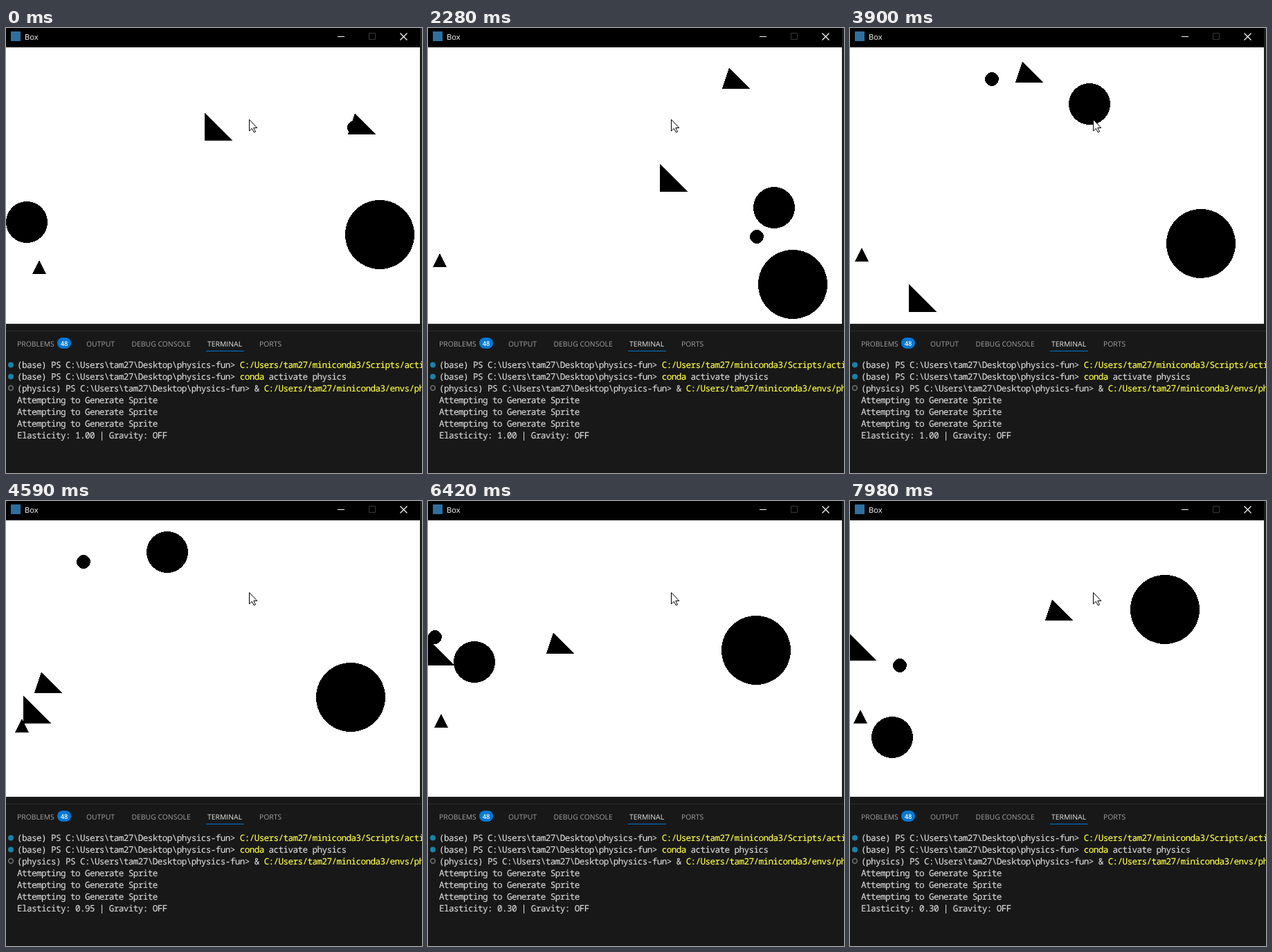
Write an HTML page that moves like this. It is 601 px wide and 644 px high and loops after 8 s.

```html
<!DOCTYPE html>
<html lang="en">
<head>
<meta charset="utf-8">
<title>Box</title>
<style>
  html, body { margin: 0; width: 100%; height: 100%; overflow: hidden; background: #181818; }
  svg { display: block; width: 601px; height: 644px; }
  text { white-space: pre; text-rendering: geometricPrecision; }
  .ui { font-family: "Open Sans", "Noto Sans", sans-serif; font-size: 10.4px; fill: #a2a2a2; }
  .term { font-family: "Noto Sans Mono", "DejaVu Sans Mono", monospace; font-size: 12.7px;
    letter-spacing: -.62px; fill: #d8d8d8; stroke: #d8d8d8; stroke-width: .15px; }
  .cmd { fill: #ffff45; stroke: #ffff45; }
</style>
</head>
<body>
<svg viewBox="0 0 601 644">
  <defs><clipPath id="view"><rect y="28" width="598" height="400"/></clipPath></defs>
  <rect width="601" height="644" fill="#181818"/>
  <rect x="598" width="3" height="428" fill="#1f1f1f"/>

  <rect width="598" height="28"/>
  <rect x="7" y="5" width="14" height="14" fill="#2f6f9f"/>
  <text class="ui" x="27" y="17" style="font-size:11.2px;fill:#fff">Box</text>
  <g fill="none" stroke="#fff">
    <path d="M479 12.5h10"/>
    <path d="M524.5 7.5h9v9h-9z" stroke="#383838"/>
    <path d="M569.5 7.5l10 10M579.5 7.5l-10 10" stroke-width="1.2"/>
  </g>

  <rect y="28" width="598" height="400" fill="#fff"/>
  <path d="M0 428.5h598" stroke="#2b2b2b"/>
  <g id="scene" clip-path="url(#view)" shape-rendering="crispEdges"></g>
  <path d="M351.5 132.5v16.5l3.8-3.6 3 5.6 2.2-1-2.7-5.5h5z" fill="#fff" stroke="#000"/>

  <path d="M0 438.5h601" stroke="#2b2b2b"/>
  <g class="ui">
    <text x="16" y="461">PROBLEMS</text>
    <rect x="74" y="448" width="20" height="16" rx="8" fill="#0078d4"/>
    <text x="84" y="460" text-anchor="middle" style="font-size:9.3px;font-weight:600;fill:#fff">48</text>
    <text x="116" y="461">OUTPUT</text>
    <text x="181.5" y="461">DEBUG CONSOLE</text>
    <text x="291" y="461" style="fill:#e7e7e7">TERMINAL</text>
    <path d="M289 467.5h55" stroke="#0078d4"/>
    <text x="366" y="461">PORTS</text>
  </g>

  <g fill="#1b81a8">
    <circle cx="7" cy="487.5" r="4"/>
    <circle cx="7" cy="504.5" r="4"/>
    <circle cx="7" cy="521" r="3.3" fill="none" stroke="#666" stroke-width="1.8"/>
  </g>
  <g class="term">
    <text x="16" y="492">(base) PS C:\Users\tam27\Desktop\physics-fun&gt; <tspan class="cmd">C:/Users/tam27/miniconda3/Scripts/activate</tspan></text>
    <text x="16" y="509">(base) PS C:\Users\tam27\Desktop\physics-fun&gt; <tspan class="cmd">conda</tspan> activate physics</text>
    <text x="16" y="526">(physics) PS C:\Users\tam27\Desktop\physics-fun&gt; &amp; <tspan class="cmd">C:/Users/tam27/miniconda3/envs/physics/python.exe</tspan></text>
    <text x="16" y="543">Attempting to Generate Sprite</text>
    <text x="16" y="560">Attempting to Generate Sprite</text>
    <text x="16" y="577">Attempting to Generate Sprite</text>
    <text id="status" x="16" y="594"></text>
  </g>
</svg>
<script>
const LOOP = 8000, STEP = 71.4;
const BOX = { left: 0, top: 28, right: 598, bottom: 428 };
const scene = document.getElementById('scene');
const status = document.getElementById('status');

// Moments when bodies collide
const [A, B, C, D, E, F, G] = [0, 1230, 2280, 3270, 4590, 6420, 7980];

// Velocity in px/s from time t until the next collision
const go = (t, vx, vy) => ({ t, vx, vy });

function addBody(d, x, y, room, ...legs) {
  const node = document.createElementNS('http://www.w3.org/2000/svg', 'path');
  node.setAttribute('d', d);
  scene.append(node);
  return { node, x, y, room, legs };
}

function addBall(r, x, y, ...legs) {
  const d = `M${-r} 0a${r} ${r} 0 1 0 ${2 * r} 0a${r} ${r} 0 1 0 ${-2 * r} 0z`;
  const room = [BOX.left + r, BOX.right - r, BOX.top + r, BOX.bottom - r];
  return addBody(d, x, y, room, ...legs);
}

// inset is how far the shape may sink into the left wall
function addTriangle(w, h, tip, inset, x, y, ...legs) {
  const room = [BOX.left - inset, BOX.right - w, BOX.top, BOX.bottom - h];
  return addBody(`M${tip} 0L0 ${h}H${w}z`, x, y, room, ...legs);
}

const bodies = [
  addBall(50, 540, 299, go(A, -1.6, 39), go(B, -10.5, 36.2), go(C, -12.7, -37.5)),
  addBall(30, 30, 281, go(A, 217, 14.6), go(B, 193.3, -37.1), go(C, 202, -96),
    go(D, -153.8, -93.2), go(E, -90.7, 86.9), go(F, -3.8, 69.9)),
  addBall(10, 503, 144, go(A, 199.2, 157.7), go(B, 44.8, 186.7), go(C, -198, -291),
    go(D, -126.5, 19.7), go(E, -55.7, 59.6), go(F, 39.7, 26.3)),
  addTriangle(40, 40, 0, 2, 287, 123, go(A, 176.4, -97.6), go(B, -160.5, 137),
    go(D, -155.5, 122.7), go(E, -14.8, -45.4), go(F, 0, -4.5)),
  addTriangle(40, 30, 10, 0, 494, 124, go(A, 42.3, -43.1), go(B, 138, -12.4),
    go(C, -105, -11.1), go(3730, -269, -272), go(E, 71, -31)),
  addTriangle(20, 20, 10, 0, 38, 336, go(A, -13.6, -4.6), go(2800, 7, -4.4), go(E, -2.1, -4))
];

// Mirror a straight flight back and forth between two walls
function bounce(v, lo, hi) {
  const span = hi - lo;
  const u = (((v - lo) % (2 * span)) + 2 * span) % (2 * span);
  return lo + span - Math.abs(span - u);
}

function place({ x, y, room, legs }, t) {
  legs.forEach((leg, i) => {
    const end = Math.min(t, legs[i + 1]?.t ?? LOOP);
    const dt = Math.max(0, end - leg.t) / 1000;
    x = bounce(x + leg.vx * dt, room[0], room[1]);
    y = bounce(y + leg.vy * dt, room[2], room[3]);
  });
  return [Math.round(x), Math.round(y)];
}

// Each picture stays for about one STEP, counted afresh from every collision
function hold(t) {
  const marks = [A, B, C, D, E, F, G, LOOP];
  const i = marks.findIndex(m => m > t) - 1;
  const span = marks[i + 1] - marks[i];
  const step = span / Math.max(1, Math.round(span / STEP));
  return marks[i] + Math.floor((t - marks[i]) / step) * step;
}

// One key press, then key repeat after half a second
function elasticity(t) {
  const presses = t < 4140 ? 0 : t < 4640 ? 1 : Math.min(14, 2 + Math.floor((t - 4640) / 33));
  return (1 - presses * 0.05).toFixed(2);
}

function draw(time) {
  const t = hold(time % LOOP);
  for (const body of bodies) {
    body.node.setAttribute('transform', `translate(${place(body, t)})`);
  }
  status.textContent = `Elasticity: ${elasticity(t)} | Gravity: OFF`;
}

const start = performance.now();
function tick() {
  draw(performance.now() - start);
  requestAnimationFrame(tick);
}
tick();
</script>
</body>
</html>
```
